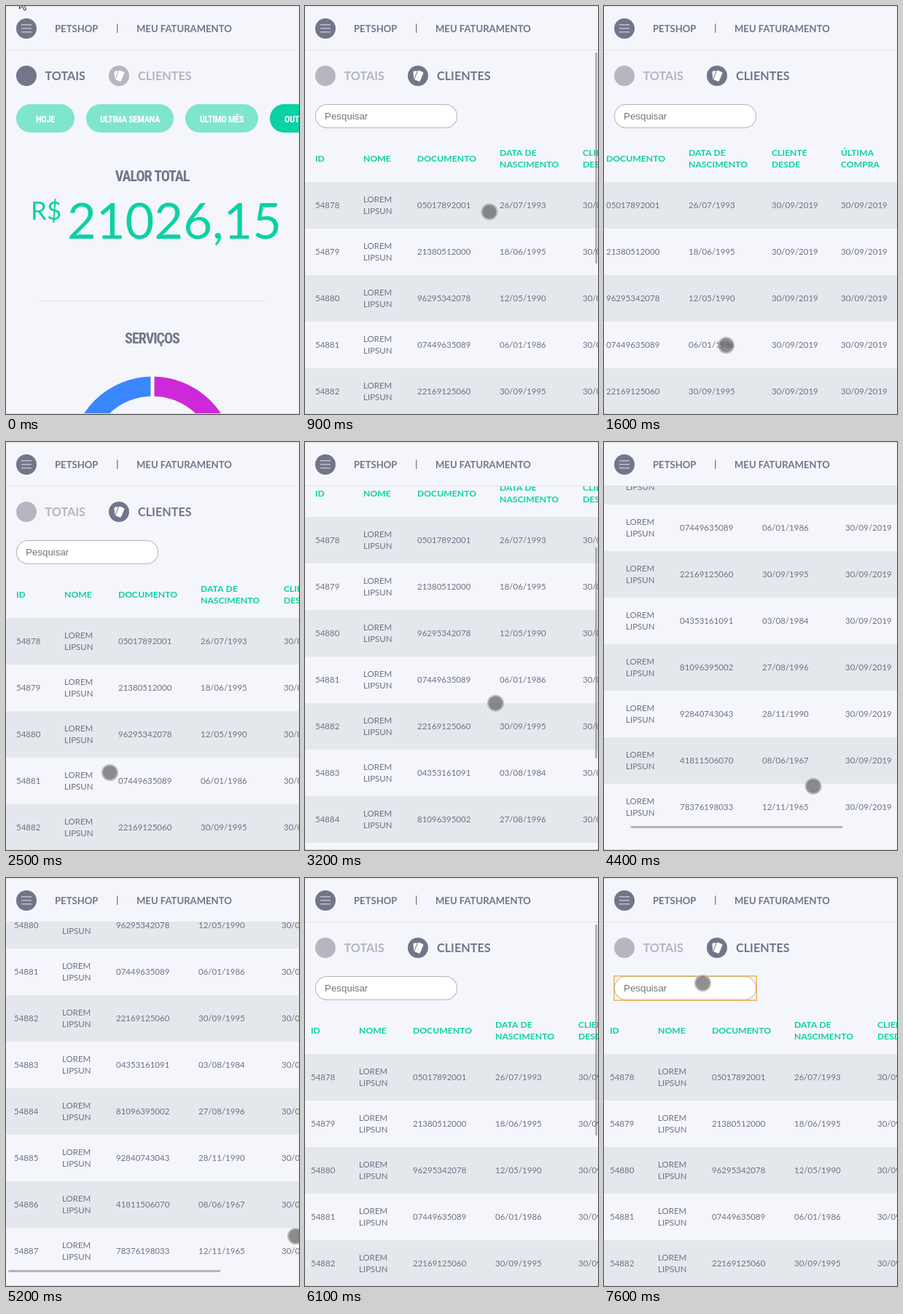
Write an HTML page with a canvas that moves like this. It is 402x561 px and loops after 8 s.

```html
<!DOCTYPE html>
<html lang="pt-BR">
<head>
<meta charset="utf-8">
<title>Faturamento</title>
<style>
  html, body { margin: 0; width: 100%; height: 100%; overflow: hidden; background: #f5f6fb; }
  canvas { display: block; width: 402px; height: 561px; }
</style>
</head>
<body>
<canvas id="stage"></canvas>
<script>
const W = 402, H = 561, LOOP = 8000, STEP = 100;
const BG = '#f5f6fb', BAND = '#e4e8ed', SLATE = '#73758a', MUTED = '#b5b6c2';
const TEXT = '#6f7184', GREEN = '#09d2a4', PALE = '#80e5cd', LINE = '#e1e3e8';
const SANS = 'Lato, sans-serif';
const NARROW = '"Roboto Condensed", "Open Sans Condensed", "Noto Sans", sans-serif';
const ROW_H = 64, TABLE_TOP = 242, MAX_X = 151, MAX_Y = 348;

const canvas = document.getElementById('stage');
const ctx = canvas.getContext('2d');
const ratio = window.devicePixelRatio || 1;
canvas.width = W * ratio;
canvas.height = H * ratio;

const CLIENTS = `05017892001 26/07/1993
21380512000 18/06/1995
96295342078 12/05/1990
07449635089 06/01/1986
22169125060 30/09/1995
04353161091 03/08/1984
81096395002 27/08/1996
92840743043 28/11/1990
41811506070 08/06/1967
78376198033 12/11/1965`.split('\n').map(line => line.split(' '));

const COLUMNS = [
  [14, 'ID'], [80, 'NOME'], [154, 'DOCUMENTO'],
  [267, 'DATA DE', 'NASCIMENTO'], [381, 'CLIENTE', 'DESDE'], [476, 'ÚLTIMA', 'COMPRA']
];

// Finger gestures: start, end, destination x, y
const GESTURES = [
  [200, 700, 185, 97],
  [700, 1100, 320, 468],
  [1100, 1600, 167, 466],
  [1600, 1900, 14, 462],
  [2100, 2500, 142, 454],
  [2500, 2900, 258, 488],
  [3000, 3600, 267, 100],
  [3600, 3900, 275, 34],
  [3900, 4300, 330, 470],
  [4300, 4600, 200, 478],
  [4600, 5200, 397, 492],
  [5200, 5600, 394, 552],
  [6400, 7100, 135, 144]
];

const ramp = (t, from, to) => Math.min(1, Math.max(0, (t - from) / (to - from)));
const easeOut = k => 1 - (1 - k) ** 2;
const shown = (t, on, off) => ramp(t, on - STEP, on) * (1 - ramp(t, off, off + 200));

function scrollX(t) {
  const first = ramp(t, 1000, 1500) - ramp(t, 2100, 2450);
  const second = ramp(t, 4300, 4600) - ramp(t, 4600, 4900);
  return Math.round(MAX_X * (first + second) + 3 * ramp(t, 4600, 4900) + 3 * ramp(t, 5200, 5500));
}

function scrollY(t) {
  const down = MAX_Y * ramp(t, 3000, 3500);
  const nudge = 11 * ramp(t, 4900, 5200);
  return Math.round(down - nudge - (MAX_Y - 11) * easeOut(ramp(t, 5200, 6100)));
}

function pointerAt(t) {
  return GESTURES.reduce(([x, y], [from, to, toX, toY]) => {
    const k = ramp(t, from, to);
    return [x + (toX - x) * k, y + (toY - y) * k];
  }, [22, 12]);
}

function label(str, x, y, font, color, align = 'left', spacing = 0) {
  ctx.font = font;
  ctx.fillStyle = color;
  ctx.textAlign = align;
  ctx.letterSpacing = spacing + 'px';
  ctx.fillText(str, x, y);
}

function rect(x, y, w, h, color) {
  ctx.fillStyle = color;
  ctx.fillRect(x, y, w, h);
}

function pill(x, y, w, h, r, color) {
  ctx.beginPath();
  ctx.roundRect(x, y, w, h, r);
  ctx.fillStyle = color;
  ctx.fill();
}

function disc(x, y, r, color) {
  ctx.beginPath();
  ctx.arc(x, y, r, 0, Math.PI * 2);
  ctx.fillStyle = color;
  ctx.fill();
}

function drawHeader() {
  rect(0, 0, W, 60, BG);
  rect(0, 60, W, 1, LINE);
  disc(28, 31, 14, SLATE);
  for (let y = 25; y <= 35; y += 5) rect(21, y, 14, 1.5, '#bfc0ca');
  const font = '700 13.1px ' + SANS;
  label('PETSHOP', 67, 35.5, font, SLATE);
  label('|', 151, 35, font, SLATE);
  label('MEU FATURAMENTO', 179, 35.5, font, SLATE);
}

function drawTabs(clients) {
  const left = clients ? MUTED : SLATE, right = clients ? SLATE : MUTED;
  const font = '700 16.2px ' + SANS;
  disc(28, 96, 14, left);
  label('TOTAIS', 53.5, 101.5, font, left);
  disc(155, 96, 14, right);
  ctx.save();
  ctx.translate(156, 96);
  ctx.rotate(-0.1);
  pill(-7, -7, 7, 12, 1.5, '#fff');
  ctx.rotate(0.5);
  pill(-4.5, -8, 9.5, 16, 2, right);
  pill(-3.5, -7, 8, 14, 1.5, '#fff');
  ctx.restore();
  label('CLIENTES', 181, 101.5, font, right);
}

function drawButton(x, w, name, textX, align, color) {
  pill(x, 135, w, 39, 19.5, color);
  label(name, textX, 159.5, 'bold condensed 12.5px ' + NARROW, '#fff', align, -0.4);
}

function drawTotals() {
  drawTabs(false);
  let x = 14;
  for (const [name, w] of [['HOJE', 80], ['ULTIMA SEMANA', 120], ['ULTIMO MÊS', 100]]) {
    drawButton(x, w, name, x + w / 2, 'center', PALE);
    x += w + 16;
  }
  drawButton(x, 130, 'OUTRO PERÍODO', x + 20, 'left', GREEN);

  const title = 'bold condensed 20px ' + NARROW;
  label('VALOR TOTAL', 200.5, 240.5, title, SLATE, 'center', -1);
  label('R$', 34, 294, '400 35px ' + SANS, GREEN);
  label('21026,15', 84, 320, '400 68.6px ' + SANS, GREEN);
  rect(44, 405, 314, 1, '#dfe1e6');
  label('SERVIÇOS', 200.5, 463.5, title, SLATE, 'center', -1);

  ctx.lineWidth = 27;
  ['#3b87ff', '#cd29d8'].forEach((color, i) => {
    const from = Math.PI * (1 + i / 2);
    ctx.beginPath();
    ctx.arc(201, 622, 99, from, from + Math.PI / 2);
    ctx.strokeStyle = color;
    ctx.stroke();
  });
  rect(198.5, 508, 5, 30, '#fafbfd');
}

function drawSearch(focused, caret) {
  pill(14, 135, 195, 33, 16, '#b3b5bf');
  pill(15, 136, 193, 31, 15, '#fff');
  label('Pesquisar', 27, 156, '13.333px "Liberation Sans", Arial, sans-serif', '#757575');
  if (focused) {
    ctx.strokeStyle = '#efb252';
    ctx.lineWidth = 1.5;
    ctx.strokeRect(13.75, 134.75, 195.5, 33.5);
  }
  if (caret) rect(27, 144, 1, 15, '#333');
}

function drawTable(scroll) {
  const head = '700 12.2px ' + SANS, body = '400 11.5px ' + SANS;
  ctx.save();
  ctx.translate(-scroll, 0);
  CLIENTS.forEach(([doc, born], i) => {
    const top = TABLE_TOP + i * ROW_H, y = top + 36;
    if (i % 2 === 0) rect(scroll, top, W, ROW_H, BAND);
    const cells = [54878 + i, '', doc, born, '30/09/2019', '30/09/2019'];
    cells.forEach((cell, c) => label(String(cell), COLUMNS[c][0], y, body, TEXT));
    label('LOREM', 80, y - 8, body, TEXT);
    label('LIPSUN', 80, y + 8, body, TEXT);
  });
  for (const [x, first, second] of COLUMNS) {
    label(first, x, second ? 206 : 214, head, GREEN);
    if (second) label(second, x, 222, head, GREEN);
  }
  ctx.restore();
}

function drawBar(x, y, w, h, alpha) {
  if (alpha > 0) pill(x, y, w, h, 1, `rgba(90, 92, 96, ${0.42 * alpha})`);
}

function drawClients(t) {
  const sx = scrollX(t), sy = scrollY(t);
  ctx.save();
  ctx.translate(0, -sy);
  drawTabs(true);
  drawSearch(t >= 7100, t >= 7100 && t < 7600);
  drawTable(sx);
  drawBar(1 + sx * 0.71, 876, 291, 3, shown(t, 4300, 5300));
  ctx.restore();
  const alpha = shown(t, 800, 1000) + shown(t, 3100, 3900) + shown(t, 5300, 6300);
  drawBar(398, 64 + 203 * sy / MAX_Y, 3, 290, alpha);
}

function drawArrow(x, y) {
  ctx.save();
  ctx.translate(x, y);
  const arrow = new Path2D('M0 0V17L4 13L6.5 19L9 18L6.5 12H12Z');
  ctx.fillStyle = '#fff';
  ctx.fill(arrow);
  ctx.strokeStyle = '#222';
  ctx.lineWidth = 1;
  ctx.stroke(arrow);
  ctx.restore();
}

function drawPointer(t) {
  if (t < 200) return drawArrow(18.5, -13);
  if (t > 5600 && t < 6400) return;
  const [x, y] = pointerAt(t);
  disc(x + 0.5, y + 0.5, 10, 'rgba(65, 65, 65, 0.59)');
  ctx.strokeStyle = 'rgba(178, 178, 178, 0.85)';
  ctx.lineWidth = 2;
  ctx.beginPath();
  ctx.arc(x + 0.5, y + 0.5, 10.5, 0, Math.PI * 2);
  ctx.stroke();
}

function render(now) {
  const t = Math.floor((now % LOOP) / STEP) * STEP;
  ctx.setTransform(ratio, 0, 0, ratio, 0, 0);
  rect(0, 0, W, H, BG);
  if (t < 800) drawTotals();
  else drawClients(t);
  drawHeader();
  rect(0, 0, W, 1, '#dfe1e5');
  rect(0, 560, W, 1, '#d8dade');
  drawPointer(t);
}

const start = performance.now();
function frame() {
  render(performance.now() - start);
  requestAnimationFrame(frame);
}
frame();
</script>
</body>
</html>
```
